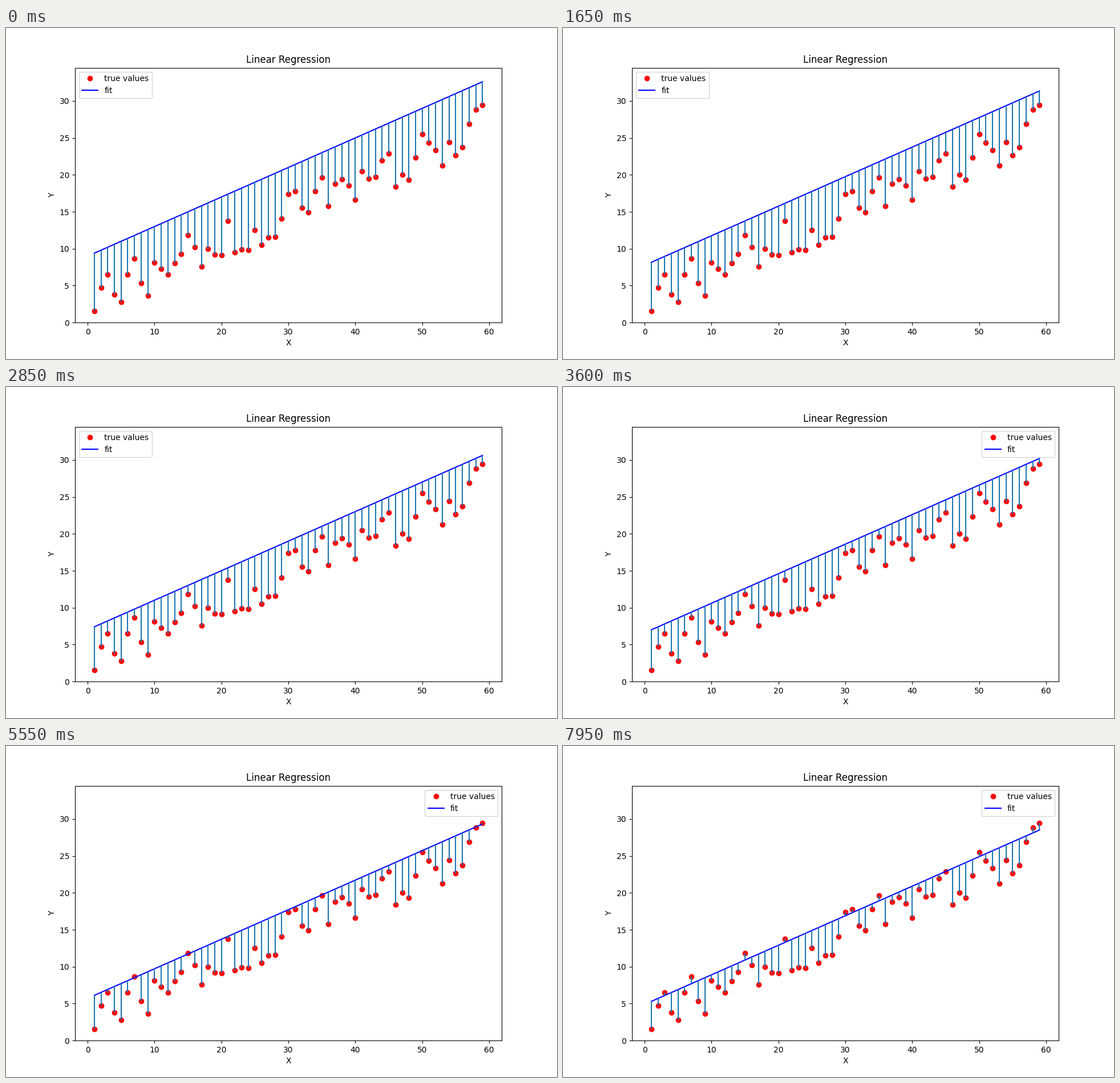
A matplotlib script for the animation above (8 s loop, 966 by 580 pixels).

```python
import numpy as np
import matplotlib.pyplot as plt
from matplotlib.animation import FuncAnimation

SLOPE = 0.4
START_INTERCEPT = 9.0
LEARNING_RATE = 0.02
TICK_MS = 50
TICKS_PER_STEP = 3
LOOP_TICKS = 160

x = np.arange(1, 60)
y = np.array([
    1.56, 4.69, 6.47, 3.80, 2.80, 6.54, 8.63, 5.35, 3.65, 8.13,
    7.30, 6.47, 8.05, 9.32, 11.85, 10.21, 7.59, 9.98, 9.22, 9.16,
    13.78, 9.54, 9.90, 9.83, 12.53, 10.52, 11.56, 11.64, 14.09, 17.37,
    17.82, 15.58, 14.92, 17.75, 19.61, 15.81, 18.80, 19.39, 18.58, 16.64,
    20.51, 19.48, 19.70, 21.93, 22.91, 18.42, 19.99, 19.31, 22.31, 25.52,
    24.32, 23.36, 21.27, 24.39, 22.67, 23.74, 26.87, 28.80, 29.48,
])
best_intercept = np.mean(y - SLOPE * x)


def fitted(step):
    """Line after `step` gradient descent updates of the intercept."""
    gap = START_INTERCEPT - best_intercept
    return SLOPE * x + best_intercept + gap * (1 - LEARNING_RATE) ** step


def residuals(fit):
    return [((xi, yi), (xi, fi)) for xi, yi, fi in zip(x, y, fit)]


fig, ax = plt.subplots(figsize=(9.66, 5.8), dpi=100)
ax.plot(x, y, "ro", label="true values")
fit_line, = ax.plot(x, fitted(0), "b", label="fit")
stems = ax.vlines(x, y, fitted(0), color="C0")
ax.set(title="Linear Regression", xlabel="X", ylabel="Y",
       xlim=(-1.9, 61.9), ylim=(0, 34.5))
# "best" moves the legend to the right once the line has cleared that corner.
ax.legend(loc="best")


def update(tick):
    fit = fitted(tick // TICKS_PER_STEP)
    fit_line.set_ydata(fit)
    stems.set_segments(residuals(fit))
    return fit_line, stems


anim = FuncAnimation(fig, update, frames=LOOP_TICKS, interval=TICK_MS,
                     init_func=lambda: update(0), repeat=True, repeat_delay=0)
plt.show()
```
